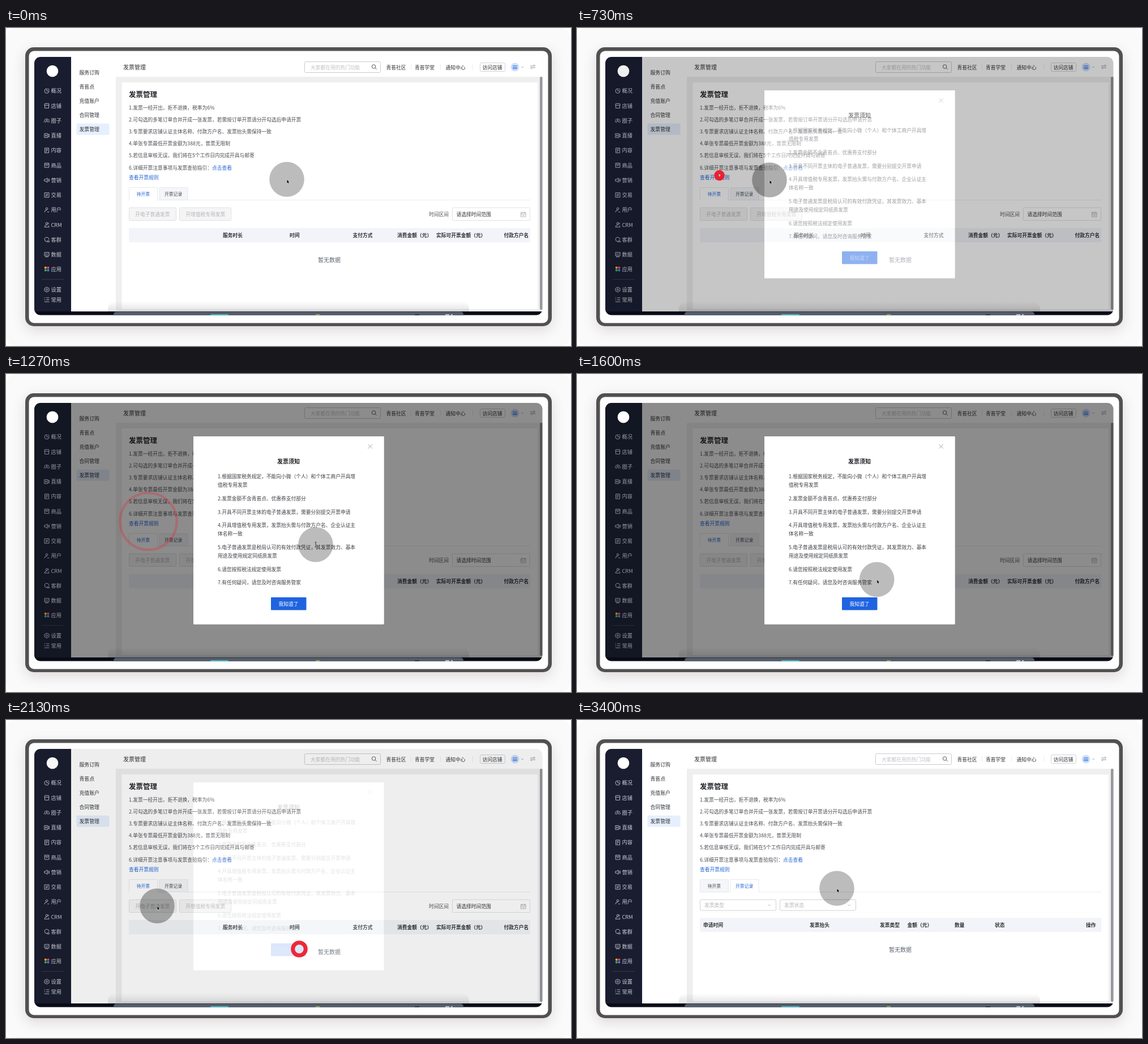
These frames come from a looping animation (998x561 px, 3.53 s). An HTML page with a canvas:

```html
<!DOCTYPE html>
<html lang="zh-CN">
<head>
<meta charset="utf-8">
<style>
html, body { margin: 0; width: 100%; height: 100%; overflow: hidden; background: #fff; }
canvas { display: block; }
</style>
</head>
<body>
<canvas id="stage" width="998" height="561"></canvas>
<script>
const ctx = document.getElementById('stage').getContext('2d');
const LOOP = 3530, STEP = 200 / 3, LAST_STEP = 51;
const FONT = '"Noto Sans CJK SC", "Noto Sans CJK", "Noto Sans", sans-serif';
const INK = '#303236', MUTED = '#b4b6ba', BLUE = '#1f63d6', LINE = '#dfe1e5';

const clamp = v => Math.max(0, Math.min(1, v));

function box(x, y, w, h, fill, stroke, r = 0) {
  ctx.beginPath();
  ctx.roundRect(x, y, w, h, r);
  if (fill) { ctx.fillStyle = fill; ctx.fill(); }
  if (stroke) { ctx.strokeStyle = stroke; ctx.lineWidth = 1; ctx.stroke(); }
}

// y is the optical middle of the line
function label(str, x, y, color = INK, size = 8.74, weight = 400) {
  ctx.font = `${weight} ${size}px ${FONT}`;
  ctx.fillStyle = color;
  ctx.fillText(str, x, y + size * 0.375);
}

function disc(x, y, r, fill) {
  ctx.beginPath();
  ctx.arc(x, y, r, 0, Math.PI * 2);
  ctx.fillStyle = fill;
  ctx.fill();
}

function shape(d, x, y, stroke, fill, width = 0.9) {
  const path = new Path2D(d);
  ctx.save();
  ctx.translate(x, y);
  if (fill) { ctx.fillStyle = fill; ctx.fill(path); }
  if (stroke) { ctx.strokeStyle = stroke; ctx.lineWidth = width; ctx.stroke(path); }
  ctx.restore();
}

const PEOPLE = 'M3.2 2.8a1.8 1.8 0 1 0 3.6 0a1.8 1.8 0 1 0-3.6 0M1 9q0-3.6 4-3.6';
const NAV = [
  ['概况', 111, 'M5 1a4 4 0 1 0 4 4H5zM6.5 .8a3.5 3.5 0 0 1 2.8 2.8'],
  ['店铺', 137.3, 'M1.5 1h7l.7 3H.8zM1.5 4v5h7V4'],
  ['圈子', 163.5, 'M3.6 3a1.4 1.4 0 1 0 2.8 0a1.4 1.4 0 1 0-2.8 0M2.6 8.5q0-3 2.4-3t2.4 3M2.4 2q-1.6.6-.6 2.4Q.3 5 .3 7.6M7.6 2q1.6.6.6 2.4Q9.7 5 9.7 7.6'],
  ['直播', 189.8, 'M.8 1.5h6v7h-6zM6.8 4l2.4-1.5v5L6.8 6M3 3.6v2.8L5 5z'],
  ['内容', 216, 'M1.5 .8h7v8.4h-7zM3 3h4M3 5h4M3 7h2'],
  ['商品', 242.2, 'M1.2 1.2h7.6v7.6H1.2zM1.2 3.6h7.6M3.5 5.2h3'],
  ['营销', 268.5, 'M.8 3.4h2L6 1.2v7.6L2.8 6.6h-2zM7.5 3.4q1 1.6 0 3.2M8.8 2q1.6 3 0 6'],
  ['交易', 294.7, 'M1 1h8v8H1zM3 4h4L5.6 2.8M7 6H3l1.4 1.2'],
  ['用户', 321, PEOPLE + 'M6 8.5h3'],
  ['CRM', 347.2, PEOPLE + 'M1 9h8q0-2-1.5-3M7 1q2 .8.6 3'],
  ['客群', 373.5, 'M5 8.2a3.7 3.7 0 1 1 3.6-3.4M5.5 8.8q0-2.5 2-2.5t2 2.5z'],
  ['数据', 399.7, 'M1 1.2h8v6H1zM2.4 5l1.8-1.4L5.6 5l2-2M2 9h6'],
  ['应用', 426],
  ['设置', 461.5, 'M5 .6l4 2.2v4.4L5 9.4 1 7.2V2.8zM3.5 5a1.5 1.5 0 1 0 3 0a1.5 1.5 0 1 0-3 0'],
  ['常用', 479.5, 'M4 1.5h5.4M4 5h5.4M.8 8.5h8.6M.6 1.5h1.6M.6 5h1.6']
];

function drawFrame() {
  ctx.fillStyle = '#fff';
  ctx.fillRect(0, 0, 998, 561);
  box(0, 0, 998, 561, '#fafafa', null, 18);
  ctx.save();
  ctx.shadowColor = 'rgba(110,80,80,.2)';
  ctx.shadowBlur = 22;
  ctx.shadowOffsetY = 7;
  box(34, 34, 930, 492, '#515151', null, 15);
  ctx.restore();
  box(40.5, 40.5, 917, 480, '#fefefe', null, 9);
}

function drawSidebar() {
  box(50, 51, 65, 449, '#191d2f');
  disc(82, 76, 10.3, '#fff');
  for (const [name, y, icon] of NAV) {
    if (icon) shape(icon, 67, y - 5, '#c3c6cf');
    else ['#f2a33a', '#e5484d', '#35a853', '#3c7df0'].forEach((c, i) =>
      disc(69.8 + i % 2 * 4.6, y - 3.2 + (i >> 1) * 4.6, 2.1, c));
    label(name, 79.5, y, '#c9ccd4', 9.2);
  }
  box(63, 443, 39, 1, '#343849');
}

function drawHeader() {
  label('发票管理', 207, 69.5, INK, 10);
  box(527.5, 59.5, 134, 19, '#fff', '#c9cbd0', 2);
  label('大家都在用的热门功能', 538, 69.3, '#bfc1c5');
  shape('M.8 4a3.3 3.3 0 1 0 6.6 0a3.3 3.3 0 1 0-6.6 0M6.5 6.5l2.7 2.7', 645.5, 64, '#44474c');
  label('青苔社区', 671.5, 69.3);
  label('青苔学堂', 722, 69.3);
  label('通知中心', 776.5, 69.3);
  for (const x of [715, 767, 824]) box(x, 64, 1, 10, '#ececee');
  box(837.5, 61.5, 44, 15, '#fff', '#cfd1d5', 2);
  label('访问店铺', 841.5, 69.3);
  disc(899, 69, 7.5, '#cfdffa');
  box(895, 66, 8, 6.5, '#6d9cf0', null, 1);
  box(895, 68, 8, 1, '#dbe7fc');
  shape('M0 0l2 2 2-2', 910, 68, '#a5a8ad');
  shape('M0 2.5h8.5L6 0M9 5.5H.5L3 8', 926, 64.5, '#85888e');
}

function drawMenu() {
  box(124.5, 168.5, 58, 20, '#e6effd', null, 2);
  ['服务订购', '青苔点', '充值账户', '合同管理', '发票管理']
    .forEach((s, i) => label(s, 129.5, 79 + i * 25, INK, 8.9));
}

function drawRecords(tab) {
  const second = tab === 1;
  box(217, 303, 709, 1, '#e9ebef');
  ['待开票', '开票记录'].forEach((s, i) => {
    const x = 217.5 + i * 53.5, on = i === tab;
    box(x, 281.5, 50, 22, on ? '#fff' : '#f5f6f9', '#e6e8ec');
    if (on) box(x + .5, 302.5, 49, 2, '#fff');
    label(s, i ? 280 : 230.7, 293.3, on ? BLUE : '#45474c', 7.8);
  });

  if (second) {
    [['发票类型', 217.5], ['发票状态', 358.5]].forEach(([s, x]) => {
      box(x, 317, 134, 19, '#fff', '#cfd1d5', 2);
      label(s, x + 7.5, 326.8, MUTED);
      shape('M0 0l2.3 2.3L4.6 0', x + 120, 325.5, '#b0b2b6');
    });
  } else {
    [['开电子普通发票', 217.5, 83], ['开增值税专用发票', 306.5, 91]].forEach(([s, x, w]) => {
      box(x, 317, w, 22.5, '#f5f5f6', LINE, 1);
      label(s, x + 10.8, 328.3, '#b3b4b7');
    });
    label('时间区间', 747, 328.8, '#505257');
    box(788.5, 317, 137, 22.5, '#fff', LINE, 1);
    label('请选择时间范围', 795.5, 328.8);
    shape('M0 1.5h8.5V9H0zM0 4h8.5M2.2 0v2.5M6.3 0v2.5M2 6.3h4.5', 909.5, 324, '#a9abb0');
  }

  const top = second ? 349 : 353;
  const columns = second
    ? [['申请时间', 223], ['发票抬头', 411], ['发票类型', 535], ['金额（元）', 583.5], ['数量', 667], ['状态', 738], ['操作', 899]]
    : [['服务时长', 383], ['时间', 501], ['支付方式', 612.5], ['消费金额（元）', 691], ['实际可开票金额（元）', 760], ['付款方户名', 879.5]];
  box(217, top, 709, 25, '#f2f4f9');
  for (const [s, x] of columns) label(s, x, top + 12.7, INK, 8.74, 700);
  label('暂无数据', 551, top + 56.3, '#5c6470', 10);
}

function drawPage(tab) {
  box(115, 51, 833, 449, '#fff');
  box(194, 86, 754, 414, '#efeff0');
  box(204.5, 96, 734.5, 400, '#fff');
  drawMenu();
  drawHeader();
  label('发票管理', 217, 117.5, '#222428', 12.5, 700);
  [
    '1.发票一经开出，拒不退换，税率为6%',
    '2.可勾选的多笔订单合并开成一张发票，若需按订单开票请分开勾选后申请开票',
    '3.专票要求店铺认证主体名称、付款方户名、发票抬头需保持一致',
    '4.单张专票最低开票金额为388元，普票无限制',
    '5.若信息审核无误，我们将在5个工作日内完成开具与邮寄',
    '6.详细开票注意事项与发票查验指引：'
  ].forEach((s, i) => label(s, 217, 140.3 + i * 21.2, '#4b4d52'));
  label('点击查看', 364, 246.3, BLUE);
  label('查看开票规则', 217, 263.8, BLUE);
  drawRecords(tab);
  box(943, 86, 5, 411, '#97989b', null, 2);

  const shade = ctx.createLinearGradient(0, 482, 0, 500);
  shade.addColorStop(0, 'rgba(90,90,95,0)');
  shade.addColorStop(1, 'rgba(90,90,95,.17)');
  box(180, 482, 638, 18, shade, null, [14, 14, 0, 0]);
}

function drawDock() {
  box(50, 500, 898, 7, '#090c17');
  box(190, 500.5, 618, 8, '#545d6b', null, [5, 5, 0, 0]);
  box(361, 505, 32, 2, '#4fd0d5', null, 1);
  box(547, 505.3, 7, 1.5, '#c9c95a');
  box(722, 505, 8, 2, '#2c3442');
  box(776, 505, 7, 2, '#d9dde2');
  box(786, 505, 3, 2, '#d9dde2');
}

function drawDialog(alpha) {
  if (!alpha) return;
  ctx.save();
  ctx.globalAlpha = alpha;
  // the dimming leaves the dialog area open, so both pictures cross-fade cleanly
  ctx.beginPath();
  ctx.rect(115, 51, 833, 449);
  ctx.rect(331, 110, 336.5, 331.5);
  ctx.fillStyle = 'rgba(0,0,0,.45)';
  ctx.fill('evenodd');
  box(50, 51, 65, 449, 'rgba(0,0,0,.25)');
  disc(82, 76, 10.3, '#fff');
  box(331, 110, 336.5, 331.5, '#fff', null, 2);
  shape('M0 0l7.5 7.5M7.5 0L0 7.5', 639.5, 124, '#9b9da2');
  label('发票须知', 479, 154.5, '#222428', 10, 700);
  [
    ['1.根据国家税务规定，不能向小微（个人）和个体工商户开具增', 181],
    ['值税专用发票', 196],
    ['2.发票金额不含青苔点、优惠券支付部分', 219.3],
    ['3.开具不同开票主体的电子普通发票，需要分别提交开票申请', 243.3],
    ['4.开具增值税专用发票，发票抬头需与付款方户名、企业认证主', 267],
    ['体名称一致', 282],
    ['5.电子普通发票是税局认可的有效付款凭证，其发票效力、基本', 305.8],
    ['用途及使用规定同纸质发票', 320.8],
    ['6.请您按照税法规定使用发票', 344.3],
    ['7.有任何疑问，请您及时咨询服务管家', 368.2]
  ].forEach(([s, y]) => label(s, 374, y, '#3d3f44'));
  box(468, 394, 62.5, 22.5, '#1f63e0', null, 1);
  label('我知道了', 481.5, 405.3, '#fff');
  ctx.restore();
}

// [time, x, y] stops of the pointer
const PATH = [
  [0, 496, 267], [400, 260, 248], [530, 252, 260], [620, 252, 260],
  [733, 340, 268], [1130, 547, 301], [1340, 547, 301], [1800, 518, 404],
  [1940, 518, 404], [2000, 526, 400], [2133, 267, 328], [2270, 267, 328],
  [2500, 289, 297], [2740, 289, 297], [3140, 710, 335], [3268, 710, 335], [3400, 459, 297]
];

function pointerAt(t) {
  const i = PATH.findIndex(p => p[0] > t);
  if (i < 0) return PATH[PATH.length - 1].slice(1);
  const [t0, x0, y0] = PATH[i - 1], [t1, x1, y1] = PATH[i];
  const k = (t - t0) / (t1 - t0), e = k * k * (3 - 2 * k);
  return [x0 + (x1 - x0) * e, y0 + (y1 - y0) * e];
}

function drawRipple(age, x, y) {
  if (age <= 0 || age >= 755) return;
  const r = age * 0.0806, width = Math.min(r, 8 - r * 0.07);
  ctx.beginPath();
  ctx.arc(x, y, r - width / 2, 0, Math.PI * 2);
  ctx.globalAlpha = 1 - (age / 760) ** 2;
  ctx.strokeStyle = '#ee1c2b';
  ctx.lineWidth = width;
  ctx.stroke();
  ctx.globalAlpha = 1;
}

function drawCursor(t, x, y) {
  const within = (a, b) => t >= a && t < b;
  if (within(450, 640) || within(1740, 2040) || within(2430, 2780)) {
    shape('M1.6 4.5V.8q0-.8.8-.8t.8.8v2.6q2.2 0 3.6.8.7.4.5 1.6l-.5 3.4H2.6L.2 6q-.5-1 .4-1.2z',
      x - 2, y + 1, '#16181c', '#fff');
  } else if (within(1080, 1600)) {
    shape('M-1.6-4.5Q0-4.5 0-3.5V3.5Q0 4.5-1.6 4.5M1.6-4.5Q0-4.5 0-3.5M0 3.5Q0 4.5 1.6 4.5', x, y, '#2a2c2f');
  } else {
    shape('M0 0v7.4l1.7-1.5 1.2 2.7 1.3-.6L3 5.4h2.3z', x, y, '#fff', '#0b0c0e', 0.6);
  }
}

function draw(t) {
  const dialog = clamp((t - 650) / 167) * clamp((2153 - t) / 130);
  const tab = t >= 2590 ? 1 : 0;
  drawFrame();

  ctx.save();
  ctx.beginPath();
  ctx.roundRect(50, 51, 897.5, 455.5, 11);
  ctx.clip();
  drawPage(tab);
  drawSidebar();
  drawDock();
  if (tab) {
    ctx.globalAlpha = 0.22 * clamp((2745 - t) / 75);
    ctx.beginPath();
    ctx.ellipse(572, 405, 10, 19, 0, 0, Math.PI * 2);
    ctx.fillStyle = '#e23b3b';
    ctx.fill();
    ctx.globalAlpha = 1;
  }
  drawDialog(dialog);
  ctx.restore();

  const [x, y] = pointerAt(t);
  const fading = dialog > 0 && dialog < 1;
  disc(x, y, 30.8, `rgba(0,4,0,${fading ? 0.32 : 0.265})`);
  drawRipple(t - 618, 251.5, 260);
  drawRipple(t - 1950, 518, 404);
  drawRipple(t - 2570, 289, 297);
  drawCursor(t, x, y);
}

// steps begin on times rounded to 10 ms, hence the small lead
const start = performance.now();
function tick() {
  const t = (performance.now() - start) % LOOP;
  draw(Math.min(LAST_STEP, Math.floor((t + 5) / STEP)) * STEP);
  requestAnimationFrame(tick);
}
tick();
</script>
</body>
</html>
```
